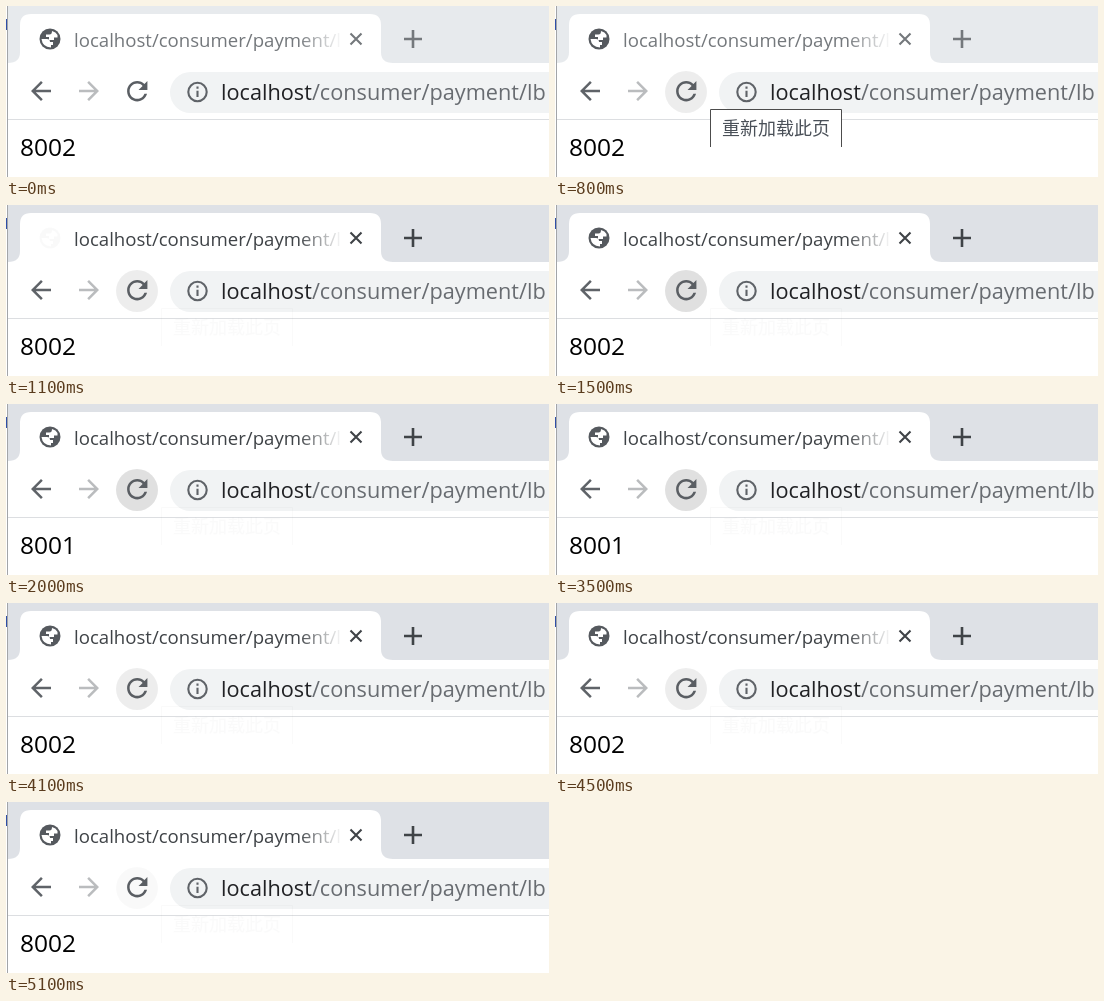
An HTML page that plays this animation: 543 px wide and 171 px high, repeating every 5.5 s.

```html
<!DOCTYPE html>
<html lang="zh">
<head>
<meta charset="utf-8">
<title>Reloading a page</title>
<style>
  html, body { margin: 0; width: 100%; height: 100%; overflow: hidden; background: #fff; }
  svg { display: block; width: 543px; height: 171px; color: #74787c; }
  svg.focused { color: #3f4347; }
  text { font-family: "Open Sans", "Noto Sans", sans-serif; white-space: pre; }
  #tip text { font-family: "Noto Sans CJK SC", "Noto Sans CJK", sans-serif; }
  .strip { fill: #e7eaed; }
  .focused .strip { fill: #dee1e6; }
</style>
</head>
<body>
<svg id="stage" viewBox="0 0 543 171">
  <defs>
    <linearGradient id="fade">
      <stop offset="0" stop-color="#fff" stop-opacity="0"/>
      <stop offset=".85" stop-color="#fff"/>
    </linearGradient>
    <path id="arrow" d="M20 11H7.83l5.59-5.59L12 4l-8 8 8 8 1.41-1.41L7.83 13H20v-2z"/>
  </defs>

  <!-- tab strip -->
  <rect width="543" height="171" fill="#fff"/>
  <rect class="strip" x="2" width="541" height="57"/>
  <path fill="#fff" d="M2 57Q14 57 14 46V19Q14 8 25 8H364Q375 8 375 19V46Q375 57 387 57Z"/>
  <rect x="1" width="1" height="171" fill="#a3a5a8"/>
  <rect y="13" width="1" height="11" fill="#2f4fa8"/>

  <g id="globe">
    <circle cx="44" cy="33" r="10.5" fill="#55595e"/>
    <path fill="#fff" d="M46 25Q50 26 51.5 29V31.5H48V34H43V31H40V28.5H43.5Q46 28.5 46 25Z
      M35.5 33H41Q44 33 44 36H47V39H45V41.5Q36.5 41 35.5 33Z"/>
  </g>
  <text x="68" y="41" font-size="18.6" fill="currentColor">localhost/consumer/payment/l</text>
  <rect x="292" y="20" width="52" height="30" fill="url(#fade)"/>
  <g fill="none" stroke="currentColor">
    <path stroke-width="2.1" d="M344.5 27.5l11 11m0-11l-11 11"/>
    <path stroke-width="2.6" d="M398 33h18m-9-9v18"/>
  </g>

  <!-- toolbar -->
  <use href="#arrow" fill="#5f6368" transform="translate(20 70) scale(1.25)"/>
  <use href="#arrow" fill="#babcbe" transform="translate(98 70) scale(-1.25 1.25)"/>
  <circle id="hover" cx="131" cy="86" r="21"/>
  <path fill="#5a5e63" transform="translate(116 70) scale(1.27)"
    d="M17.65 6.35C16.2 4.9 14.21 4 12 4c-4.42 0-7.99 3.58-7.99 8s3.57 8 7.99 8c3.73 0 6.84-2.55 7.73-6h-2.08c-.82 2.33-3.04 4-5.65 4-3.31 0-6-2.69-6-6s2.69-6 6-6c1.66 0 3.14.69 4.22 1.78L13 11h7V4l-2.35 2.35z"/>
  <rect x="164" y="66" width="420" height="41" rx="20.5" fill="#f1f3f4"/>
  <g fill="none" stroke="#5f6368" stroke-width="2.1">
    <circle cx="191.5" cy="86" r="9.2"/>
    <path d="M191.5 84.7V91M191.5 80.5v2.2"/>
  </g>
  <text x="215" y="94.2" font-size="21.7" fill="#202124">localhost<tspan fill="#686c71">/consumer/payment/lb</tspan></text>
  <rect x="2" y="113" width="541" height="1" fill="#dcdee1"/>

  <!-- page -->
  <text id="port" x="14" y="150" font-size="24.5"></text>

  <g id="tip">
    <rect x="155" y="103" width="132" height="38" fill="#fff"/>
    <path fill="none" stroke="#4c4c4c" d="M155.5 141V103.5H286.5V141"/>
    <text x="167" y="129" font-size="18" fill="#4a5058">重新加载此页</text>
  </g>
</svg>
<script>
  const LOOP = 5500, STEP = 100;
  const [stage, globe, hover, port, tip] =
    ["stage", "globe", "hover", "port", "tip"].map(id => document.getElementById(id));

  // Slow reloads blank the site icon for one step; quick ones do not.
  const slow = [1200, 1500, 2900, 3200];
  for (let t = 3700; t <= 4500; t += 200) slow.push(t);
  const quick = [2000, 2500, 3500];
  const loads = [...slow, ...quick];

  const within = (t, from, to) => t >= from && t < to;

  function hoverShade(t) {
    if (t >= 4900) return .025;
    if (within(t, 1200, 4100)) return .12;
    return .07 * Math.min(1, Math.max(0, (t - 200) / 600));
  }

  function draw(now) {
    const t = Math.floor(now % LOOP / STEP) * STEP;
    const served = loads.filter(at => at <= t).length;
    const waiting = slow.some(at => within(t, at - STEP, at));

    port.textContent = 8002 - served % 2;   // two servers take turns
    globe.style.opacity = waiting ? .03 : 1;
    hover.style.opacity = hoverShade(t);
    tip.style.opacity = t < 800 ? 0 : t < 1000 ? 1 : .025;
    stage.classList.toggle("focused", t >= 1000);
  }

  function tick(now) {
    draw(now);
    requestAnimationFrame(tick);
  }
  draw(0);
  requestAnimationFrame(tick);
</script>
</body>
</html>
```
